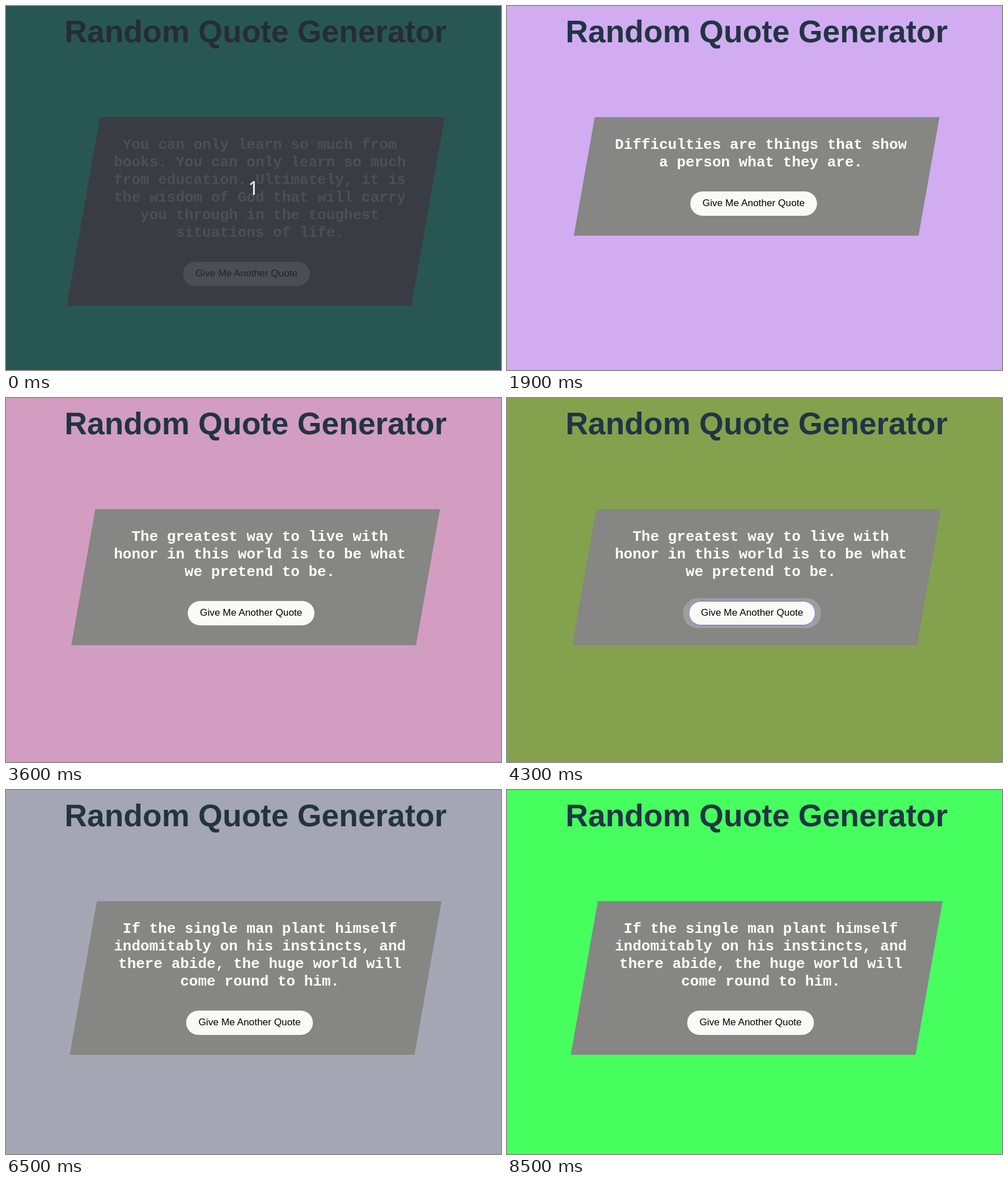
Recreate the animation shown at these times as an HTML page. Size 873x642 px, loop 9200 ms.

```html
<!DOCTYPE html>
<html lang="en">
<head>
<meta charset="utf-8">
<title>Random Quote Generator</title>
<style>
  html, body { margin: 0; width: 100%; height: 100%; overflow: hidden; }
  svg { display: block; width: 873px; height: 642px; }
  text { text-anchor: middle; }
  #title { font: bold 55.15px Arial, "Liberation Sans", sans-serif; fill: #223444; }
  #quote { font: bold 26px "Courier New", "Liberation Mono", monospace; fill: #fff; }
  #label { font: 17.25px Arial, "Liberation Sans", sans-serif; fill: #000; }
  #count { font: 32px "Segoe UI", "Open Sans", sans-serif; fill: #fff; display: none; }
  #card { fill: #868684; }
  #pill { fill: #f9f9f7; }
  #halo { fill: #fff; fill-opacity: .2; }
  #edge { fill: none; stroke: #5b6be8; }
  .dim #count { display: inline; }
  .dim #back { fill: #285753; }
  .dim #title { fill: #262c35; }
  .dim #card { fill: #3a3c43; }
  .dim #quote { fill: #4c5055; }
  .dim #pill { fill: #4b4f54; }
  .dim #label { fill: #1f252b; }
</style>
</head>
<body>
<svg id="stage" viewBox="0 0 873 642">
  <rect id="back" width="873" height="642"/>
  <text id="title" x="440.2" y="64">Random Quote Generator</text>
  <polygon id="card"/>
  <g id="quote"></g>
  <g id="button">
    <g id="ring"><rect id="halo" x="-10" y="-5" width="243.5" height="53" rx="26.5"/></g>
    <rect id="pill" width="223.5" height="43" rx="21.5"/>
    <rect id="edge" x=".5" y=".5" width="222.5" height="42" rx="21"/>
    <text id="label" x="111.75" y="26">Give Me Another Quote</text>
  </g>
  <text id="count" x="436.5" y="333">1</text>
</svg>
<script>
const LOOP = 9200, STEP = 100, FADE = 500;
const SLANT = Math.tan(10 * Math.PI / 180);
const TOP = 196, LEFT = 136.3, WIDTH = 608, LINE = 31;

const quotes = [
  ["You can only learn so much from", "books. You can only learn so much",
   "from education. Ultimately, it is", "the wisdom of God that will carry",
   "you through in the toughest", "situations of life."],
  ["Difficulties are things that show", "a person what they are."],
  ["The greatest way to live with", "honor in this world is to be what", "we pretend to be."],
  ["If you spend your whole life", "waiting for the storm, you'll", "never enjoy the sunshine."],
  ["If the single man plant himself", "indomitably on his instincts, and",
   "there abide, the huge world will", "come round to him."]
];

// Each click swaps the quote and fades the page to a new colour.
const clicks = [
  { at: -FADE, quote: 0, color: [46, 255, 240] },
  { at: 1635, quote: 1, color: [242, 155, 241] },
  { at: 3500, quote: 2, color: [132, 162, 77] },
  { at: 4800, quote: 3, color: [102, 231, 226] },
  { at: 6100, quote: 4, color: [166, 165, 178] },
  { at: 8000, quote: 4, color: [70, 255, 94] }
];
const hovers = [[400, 1700], [2600, 3500], [4000, 6100], [7200, 8000]];

const $ = id => document.getElementById(id);
const cubic = (a, b, u) => 3 * a * u * (1 - u) ** 2 + 3 * b * u * u * (1 - u) + u ** 3;

// CSS "ease" curve
function ease(x) {
  if (x <= 0) return 0;
  if (x >= 1) return 1;
  let lo = 0, hi = 1;
  for (let i = 0; i < 24; i++) {
    const mid = (lo + hi) / 2;
    if (cubic(.25, .25, mid) < x) lo = mid; else hi = mid;
  }
  return cubic(.1, 1, lo);
}

let shown = -1;
function layout(index) {
  if (index === shown) return;
  shown = index;
  const lines = quotes[index];
  const h = 147 + LINE * lines.length;
  const shift = h / 2 * SLANT, right = LEFT + WIDTH, bottom = TOP + h;
  $("card").setAttribute("points",
    `${LEFT + shift},${TOP} ${right + shift},${TOP} ${right - shift},${bottom} ${LEFT - shift},${bottom}`);
  $("quote").replaceChildren(...lines.map((line, i) => {
    const el = document.createElementNS("http://www.w3.org/2000/svg", "text");
    el.setAttribute("x", 447.7);
    el.setAttribute("y", 252 + LINE * i);
    el.textContent = line;
    return el;
  }));
  const x = 331.7 - SLANT * (h / 2 - 56.5);
  $("button").setAttribute("transform", `translate(${x} ${bottom - 78})`);
}

function draw(time) {
  const t = Math.floor(time % LOOP / STEP) * STEP;
  let n = clicks.length - 1;
  while (clicks[n].at > t) n--;
  const now = clicks[n], from = clicks[Math.max(0, n - 1)].color;
  const p = ease((t - now.at) / FADE);
  const rgb = now.color.map((c, i) => Math.round(from[i] + (c - from[i]) * p));
  $("back").setAttribute("fill", `rgb(${rgb})`);
  layout(now.quote);

  const hover = hovers.find(([a, b]) => t >= a && t < b);
  const glow = hover ? Math.min(1, (t - hover[0] + STEP) / (2 * STEP)) : 0;
  $("ring").setAttribute("opacity", glow);
  $("edge").setAttribute("opacity", glow);
  $("stage").classList.toggle("dim", t < STEP);
}

const start = performance.now();
function tick() {
  draw(performance.now() - start);
  requestAnimationFrame(tick);
}
tick();
</script>
</body>
</html>
```
